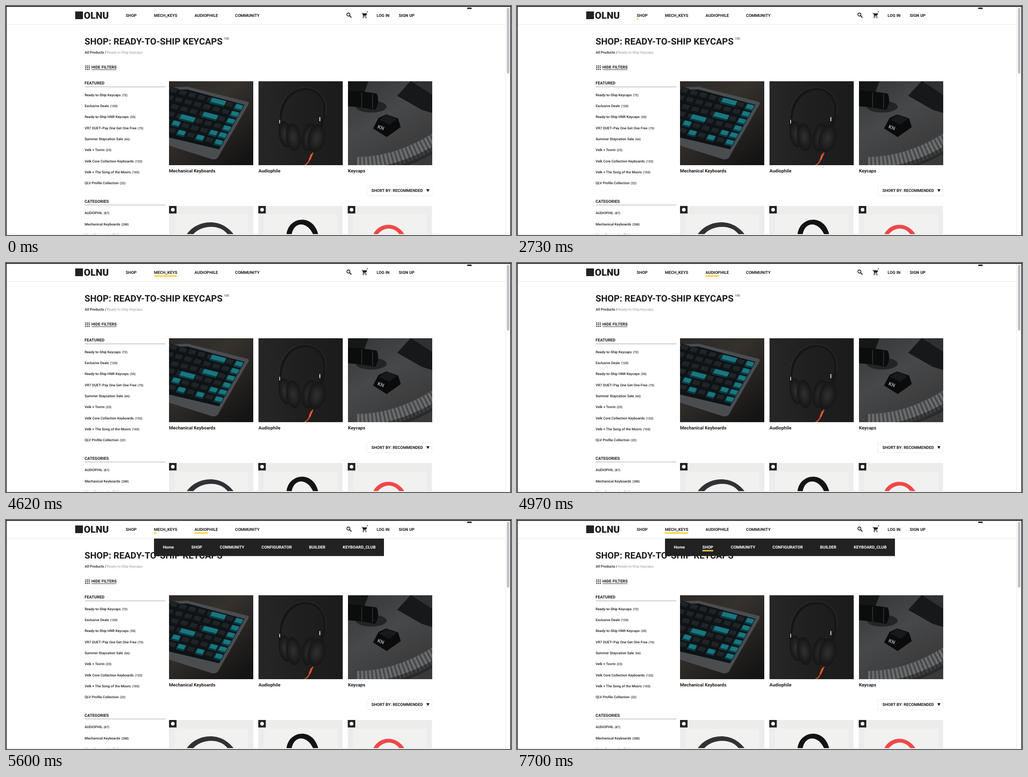
An HTML page for the animation above (8 s loop, 1109 by 505 pixels).

```html
<!DOCTYPE html>
<html lang="en">
<head>
<meta charset="utf-8">
<title>Shop page</title>
<style>
  html, body { margin: 0; width: 100%; height: 100%; overflow: hidden; background: #fff; }
  svg { display: block; width: 1109px; height: 505px; }
  text { font-family: Roboto, Arial, sans-serif; font-size: 9px; font-weight: 700; fill: #1c1c1c; text-rendering: geometricPrecision; white-space: pre; }
  .item { font-size: 7.7px; font-weight: 500; }
  .count { font-size: 6.8px; }
  #menu text { fill: #fff; }
  .bar { fill: #fbcf2d; }
  #menu .bar { fill: #ffc74a; }
</style>
</head>
<body>
<svg viewBox="0 0 1109 505">
  <defs>
    <linearGradient id="desk" x1="0" y1="0" x2=".8" y2="1">
      <stop offset="0" stop-color="#2b2826"/><stop offset=".4" stop-color="#35312d"/><stop offset="1" stop-color="#151414"/>
    </linearGradient>
    <linearGradient id="wall" x2="1" y2="0">
      <stop offset="0" stop-color="#272727"/><stop offset=".5" stop-color="#1f1f1f"/><stop offset="1" stop-color="#1b1b1b"/>
    </linearGradient>
    <linearGradient id="table" x1="0" y1="0" x2=".6" y2="1">
      <stop offset="0" stop-color="#353637"/><stop offset=".5" stop-color="#474849"/><stop offset="1" stop-color="#39393a"/>
    </linearGradient>
    <radialGradient id="cup">
      <stop offset="0" stop-color="#313132"/><stop offset="1" stop-color="#151515"/>
    </radialGradient>
    <clipPath id="c1"><path d="M358 166h185v185h-185z"/></clipPath>
    <clipPath id="c2"><path d="M554.5 166h185v185h-185z"/></clipPath>
    <clipPath id="c3"><path d="M751 166h185v185h-185z"/></clipPath>
  </defs>

  <!-- header -->
  <path d="M1 40.5H1097" stroke="#e9e9e9"/>
  <path d="M152 12h17v17h-17z" fill="#222"/>
  <g fill="none" stroke="#1a1a1a" stroke-width="1.6">
    <circle cx="751.9" cy="18.8" r="3.4"/>
    <path d="M754.3 21.2l4.3 4.3" stroke-width="1.9"/>
  </g>
  <path d="M1 2v2h2l3.6 7.6-1.4 2.4C4.5 15.4 5.5 17 7 17h12v-2H7.4l1.1-2h7.5c.8 0 1.4-.4 1.7-1l3.6-6.5c.4-.7-.1-1.5-.9-1.5H5.2l-.9-2zM7 18a2 2 0 1 0 .01 0zM17 18a2 2 0 1 0 .01 0z" transform="translate(780.5 14) scale(.58)" fill="#1a1a1a"/>
  <circle cx="793.5" cy="12.7" r="1.5" fill="#e0414d"/>
  <path d="M1012.5 6.5q0-3 2.500-3h1.5q1 0 1.2.7q.2-.7 1.2-.7h1.5q2.5 0 2.5 3z" fill="#111"/>

  <!-- filters -->
  <path id="dots" fill="#1f1f1f"/>
  <path d="M188 140.5H242.5" stroke="#333"/>
  <path d="M173 178.3H350M173 438.8H350" stroke="#9c9f9f"/>
  <path d="M792.5 396.5h143v22h-143z" fill="none" stroke="#ececec"/>
  <path d="M923 404h7l-3.5 6.3z" fill="#1a1a1a"/>

  <!-- keyboard -->
  <g clip-path="url(#c1)">
    <path d="M358 166h185v185h-185z" fill="url(#desk)"/>
    <path d="M350 184L398 182L529 215L462 332Q458 336 450 333L350 301z" fill="#4a4d50" stroke="#4a4d50" stroke-width="8" stroke-linejoin="round"/>
    <path d="M350 186L398 184L524 218L468 316L350 288z" fill="#0e1214"/>
    <g id="keys"></g>
  </g>

  <!-- headphones -->
  <g clip-path="url(#c2)">
    <path d="M554 166h186v185h-186z" fill="url(#wall)"/>
    <g fill="none" stroke-linecap="round">
      <path d="M602 266C595 161 713 157 699 244L690 270" stroke="#161616" stroke-width="6"/>
      <path d="M600 250C598 158 714 158 702 240" stroke="#2b2b2c" stroke-width="1.5"/>
      <path d="M674 324L668 336Q664 347 655 352" stroke="#d64a2c" stroke-width="2.5"/>
      <path d="M671 328L667 338" stroke="#ee5630" stroke-width="4"/>
    </g>
    <g fill="url(#cup)">
      <ellipse cx="613" cy="283" rx="14" ry="29" transform="rotate(-9 613 283)"/>
      <ellipse cx="631" cy="289" rx="16" ry="31" transform="rotate(-7 631 289)"/>
      <ellipse cx="666" cy="289" rx="16" ry="31" transform="rotate(10 666 289)"/>
      <ellipse cx="682" cy="292" rx="19" ry="31" transform="rotate(12 682 292)"/>
    </g>
    <path d="M600 251h2v8h-2zM688 245h2.3v9h-2.3z" fill="#c2c2c2"/>
  </g>

  <!-- desk scene -->
  <g clip-path="url(#c3)">
    <path d="M751 166h185v185h-185z" fill="url(#table)"/>
    <path d="M751 166h45l-9 24h-36z" fill="#151616"/>
    <ellipse cx="802" cy="222" rx="34" ry="13" fill="#232425"/>
    <path d="M751 186L786 189L814 193Q822 210 811 229L782 224L751 221z" fill="#0b0c0c"/>
    <path d="M781 191v32M805 194v32" stroke="#2a2b2c" stroke-width="2"/>
    <path d="M859 198L888 166H936V236L913 229z" fill="#17181a"/>
    <path d="M890 166H936V196z" fill="#2f3031"/>
    <path d="M835 239L861 248L867 267L836 289L806 270L818 247z" fill="#0b0b0c"/>
    <path d="M835 240L858 249L842 262L819 251z" fill="#18191a"/>
    <path d="M771 350Q858 350 945 296" fill="none" stroke="#474849" stroke-width="36"/>
    <path d="M771 349Q858 349 945 295" fill="none" stroke="#6b6c6d" stroke-width="32" stroke-dasharray="5 4"/>
    <path d="M787 365Q872 358 950 310" fill="none" stroke="#1b1b1b" stroke-opacity=".55" stroke-width="14"/>
    <text transform="translate(815 269) rotate(20)" style="font-size:11px;fill:#9b9c9d">KN</text>
  </g>

  <!-- products -->
  <g id="cards"></g>
  <path d="M396 505C415 474 470 462 501 505H488C470 478 425 484 410 505z" fill="#313236"/>
  <path d="M616 505C618 465 675 455 686 505H675C662 474 632 474 627 505z" fill="#141414"/>
  <path d="M806 505C818 476 858 474 876 505H865C852 486 830 486 815 505z" fill="#ef4848"/>

  <g id="copy"></g>
  <g id="bars"></g>
  <g id="menu"><path d="M325 41h505v38.5h-505z" fill="#222"/></g>

  <!-- window edges -->
  <path d="M0 503h1109v2H0z" fill="#fff"/>
  <path d="M0 503.5H1098" stroke="#e4e4e6"/>
  <path d="M1097.5 2V503" stroke="#e6e6e6"/>
  <rect x="1100" y="4" width="5.5" height="145" rx="2.7" fill="#c1c1c1"/>
  <path d="M0 1H1109" stroke="#30313a" stroke-width="2"/>
  <path d="M.75 0V505M1108.25 0V505" stroke="#25233b" stroke-width="1.5"/>
</svg>
<script>
const $ = id => document.getElementById(id);
const add = (id, markup) => $(id).insertAdjacentHTML('beforeend', markup);
const label = (x, y, s, style = '', id = 'copy') =>
  add(id, `<text x="${x}" y="${y}" style="${style}">${s}</text>`);
const item = (y, s, n) =>
  add('copy', `<text class="item" x="172.7" y="${y}">${s}<tspan class="count" dx="2.5">(${n})</tspan></text>`);

// Header and headings
label(171, 28, 'OLNU', 'font-size:21px;font-weight:900');
[[263, 'SHOP'], [325, 'MECH_KEYS'], [414, 'AUDIOPHILE'], [503, 'COMMUNITY']].forEach(([x, s]) => label(x, 24.3, s));
[[814, 'LOG IN'], [862.5, 'SIGN UP']].forEach(([x, s]) => label(x, 23.7, s));
label(172.5, 85, 'SHOP: READY-TO-SHIP KEYCAPS', 'font-size:19.93px');
label(478.5, 74, '100', 'font-size:6.6px;font-weight:400');
label(173, 104.5, 'All Products /', 'font-size:7.75px;font-weight:500');
label(221.5, 104.5, 'Ready-to-Ship Keycaps', 'font-size:7.75px;font-weight:400;fill:#999');
label(187.5, 137.7, 'HIDE FILTERS');
label(172.5, 173, 'FEATURED');
label(172.5, 433.8, 'CATEGORIES');
label(802.5, 409.7, 'SHORT BY: RECOMMENDED', 'font-size:8.95px');
[[358, 'Mechanical Keyboards'], [554.5, 'Audiophile'], [751, 'Keycaps']]
  .forEach(([x, s]) => label(x, 366.8, s, 'font-size:10px'));

[['Ready-to-Ship Keycaps', 72], ['Exclusive Deals', 120], ['Ready-to-Ship HNR Keycaps', 55],
 ['VR7 DUET–Pay One Get One Free', 75], ['Summer Staycation Sale', 66], ['Velk + Tovrin', 23],
 ['Velk Core Collection Keyboards', 132], ['Velk + The Song of the Moors', 105], ['QLV Profile Collection', 22]]
  .forEach(([s, n], i) => item(198.7 + i * 24.3, s, n));
[['AUDIOPHIL', 87], ['Mechanical Keyboards', 288], ['More Community Picks', 94]]
  .forEach(([s, n], i) => item(459.3 + i * 24.3, s, n));

let dots = '';
for (let i = 0; i < 9; i++) dots += `M${174 + i % 3 * 3.8} ${131.3 + (i / 3 | 0) * 3.8}h2.2v2.2h-2.2z`;
$('dots').setAttribute('d', dots);

for (const x of [358, 554, 750.5]) add('cards',
  `<path d="M${x} 441h185v64h-185z" fill="#ececec"/><path d="M${x + 12} 460h162v45h-162z" fill="#f1f1f0"/>
   <path d="M${x} 441h16.5v16.5h-16.5z" fill="#222"/><circle cx="${x + 8.3}" cy="449.3" r="4" fill="#fff"/>`);

// Keycaps: digits are row, then column counted from the right
const teal = ['00', '02', '10', '20', '22', '30', '34', '40', '41', '45', '50', '52', '54'];
const wide = ['02', '22', '34'];
for (let r = 0; r < 6; r++) for (let k = 8; k >= 0; k--) {
  const id = `${r}${k}`, lit = teal.includes(id), w = wide.includes(id) ? 42 : 17;
  const x = 511 - 8.8 * r - 20.5 * k, y = 223 + 15.6 * r - 5.2 * k;
  add('keys', `<g transform="matrix(.97 .25 -.45 .88 ${x} ${y})">
    <rect x="${-w / 2 - 1}" y="-7" width="${w + 2}" height="15" rx="2" fill="${lit ? '#0b3b42' : '#111517'}"/>
    <rect x="${-w / 2 + 1}" y="-6" width="${w - 2}" height="10" rx="2" fill="${lit ? '#1a7681' : '#1e2427'}"/></g>`);
}

[[344.5, 'Home'], [407, 'SHOP'], [469.5, 'COMMUNITY'], [561, 'CONFIGURATOR'], [665.5, 'BUILDER'], [739.5, 'KEYBOARD_CLUB']]
  .forEach(([x, s]) => label(x, 63.2, s, '', 'menu'));

// Underlines: each listed time toggles the bar between closed and open
const bars = [
  ['bars', 263, 27.2, 24, [2695, 3250]],
  ['bars', 325, 27.2, 51, [3320, 4610, 5570]],
  ['bars', 414, 27.2, 51, [4870, 5525]],
  ['menu', 344.5, 66.2, 24, [6060, 6700, 7060, 7405]],
  ['menu', 407, 66.2, 24, [7405]],
].map(([parent, x, y, width, toggles]) => {
  add(parent, `<rect class="bar" x="${x}" y="${y}" height="3"/>`);
  return { el: $(parent).lastElementChild, width, toggles };
});

// cubic-bezier(.25, .1, .25, 1)
function ease(p) {
  if (p >= 1) return 1;
  let lo = 0, hi = 1, s;
  for (let i = 0; i < 20; i++) {
    s = (lo + hi) / 2;
    const x = .75 * s * (1 - s) + s ** 3;
    if (x < p) lo = s; else hi = s;
  }
  return .3 * s * (1 - s) ** 2 + 3 * s * s * (1 - s) + s ** 3;
}

function openness(toggles, t) {
  const past = toggles.filter(at => at <= t);
  if (!past.length) return 0;
  const p = ease((t - past[past.length - 1]) / 300);
  return past.length % 2 ? p : 1 - p;
}

const start = performance.now();
function draw(now) {
  const t = Math.max(0, now - start) % 8000;
  for (const b of bars) b.el.setAttribute('width', b.width * openness(b.toggles, t));
  const open = t >= 3320 && t < 4610 || t >= 5570;
  $('menu').setAttribute('visibility', open ? 'visible' : 'hidden');
  requestAnimationFrame(draw);
}
draw(start);
</script>
</body>
</html>
```
